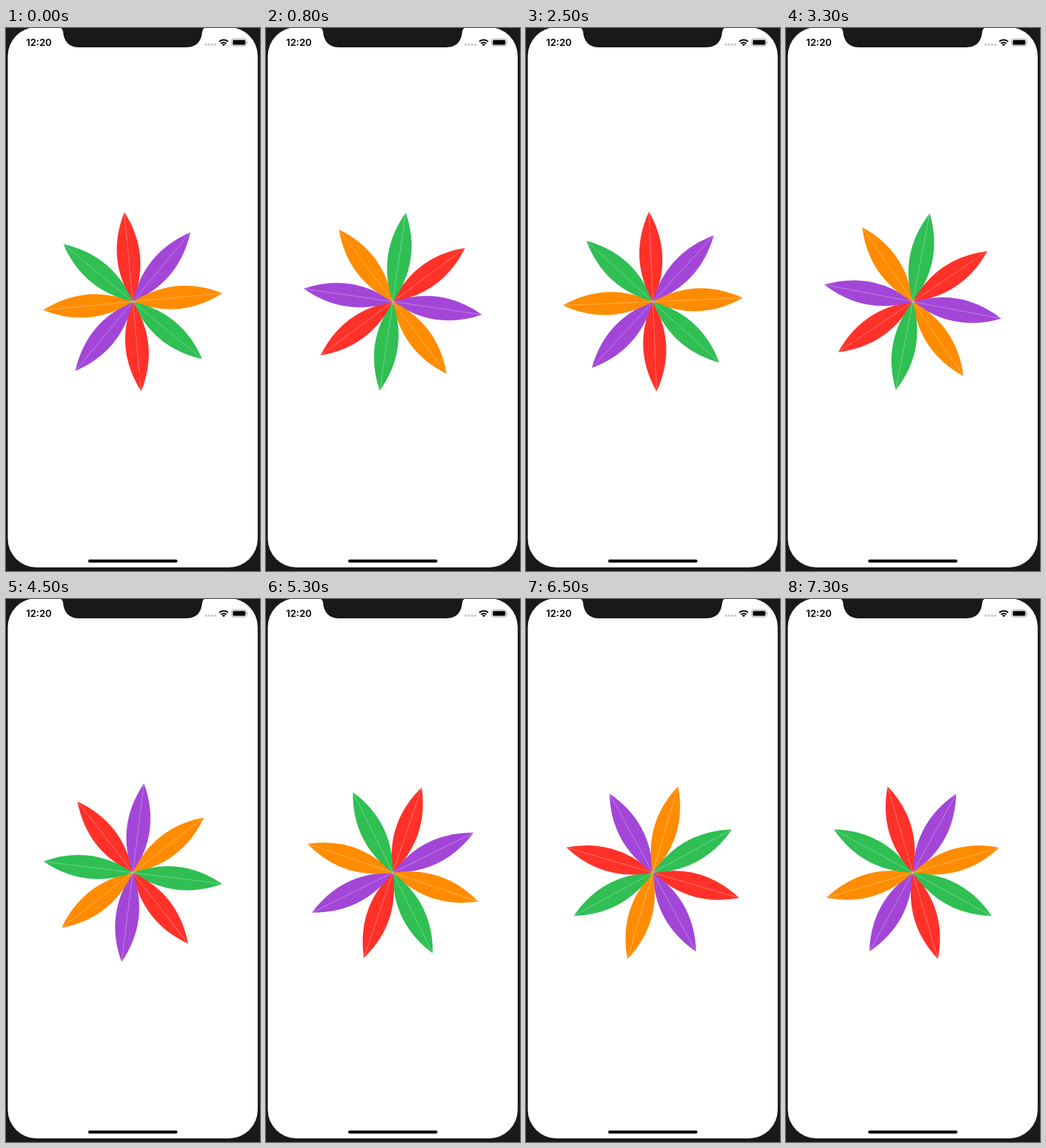
Recreate the animation shown at these times as an HTML page. Size 354 px wide and 758 px high, loop 7400 ms.

```html
<!DOCTYPE html>
<html lang="en">
<head>
<meta charset="utf-8">
<title>Spinning flower</title>
<style>
  html, body { margin: 0; width: 100%; height: 100%; overflow: hidden; background: #191919; }
  svg { display: block; width: 100%; height: 100%; }
  text { font: 600 13.5px Inter, sans-serif; }
</style>
</head>
<body>
<svg viewBox="0 0 354 758">
  <defs>
    <path id="petal" d="M0 0Q-32-62.8 0-125.6Q32-62.8 0 0Z"/>
    <path id="vein" d="M0 0V-124" stroke="#fff" stroke-opacity=".42" stroke-width=".7"/>
  </defs>

  <!-- Screen and notch -->
  <rect x="2.5" y="-1" width="348.3" height="754" rx="40" fill="#fff"/>
  <path d="M74 -1Q79 0 79.5 5C80.5 19 88 27 102 27H251C265 27 272.5 19 273.5 5Q274 0 279 -1Z" fill="#191919"/>

  <!-- Status bar -->
  <text x="28" y="25">12:20</text>
  <g id="signal" fill="#c6c6c6"></g>
  <g fill="none" stroke="#000" stroke-width="2.1">
    <path d="M297.3 19.1A8.6 8.6 0 0 1 309.5 19.1"/>
    <path d="M299.7 21.7A5.3 5.3 0 0 1 307.1 21.7"/>
  </g>
  <path d="M303.4 25.3L301.2 23.1A3.1 3.1 0 0 1 305.6 23.1Z"/>
  <rect x="314.4" y="15.2" width="20.8" height="9.8" rx="2.9" fill="none" stroke="#999" stroke-width=".9"/>
  <rect x="316" y="16.8" width="17.6" height="6.6" rx="1.5"/>
  <path d="M336.2 18.4Q338 20.1 336.2 21.8Z" fill="#999"/>

  <g id="flower"></g>
  <rect x="114.5" y="742" width="124.5" height="4.2" rx="2.1"/>
  <path id="cursor" d="M0 0V11.4L2.6 9L4.4 13L6.4 12.1L4.7 8.2H8Z" stroke="#fff" stroke-width=".8"/>
</svg>
<script>
const LOOP = 7400, STEP = 100;
const COLORS = ['#ff3129', '#a346d8', '#ff8c00', '#2fbf53'];

// [time in ms, values...]: the spin stays close to 72 degrees per second
const SPIN = [[0, -5.35], [1700, 119.3], [3300, 235.85], [4500, 322.15],
              [5300, 378.7], [6500, 466.3], [7300, 523.8]];
const POINTER = [[1500, 0, 225], [1700, 111, 118], [1800, 140, 32]];

const byId = id => document.getElementById(id);
const flower = byId('flower'), cursor = byId('cursor');

byId('signal').innerHTML = [278.6, 282.9, 287.2, 291.5]
  .map(x => `<circle cx="${x}" cy="23.2" r="1.6"/>`).join('');

const petals = Array.from({ length: 8 }, (_, i) => ({ turn: i * 45, color: COLORS[i % 4] }));
flower.innerHTML = petals.map(({ turn, color }) =>
  `<g transform="rotate(${turn})"><use href="#petal" fill="${color}"/><use href="#vein"/></g>`).join('');

function valuesAt(keys, time) {
  const next = Math.max(1, keys.findIndex(key => key[0] >= time));
  const [t0, ...from] = keys[next - 1];
  const [t1, ...to] = keys[next];
  const part = (time - t0) / (t1 - t0);
  return from.map((value, i) => value + (to[i] - value) * part);
}

function draw(now) {
  const time = Math.floor(now % LOOP / STEP) * STEP;
  flower.setAttribute('transform', `translate(176.7 382) rotate(${valuesAt(SPIN, time)[0]})`);

  const visible = time >= POINTER[0][0] && time <= POINTER.at(-1)[0];
  cursor.setAttribute('visibility', visible ? 'visible' : 'hidden');
  if (visible) cursor.setAttribute('transform', `translate(${valuesAt(POINTER, time)})`);
}

function tick() {
  draw(performance.now());
  requestAnimationFrame(tick);
}
tick();
</script>
</body>
</html>
```
